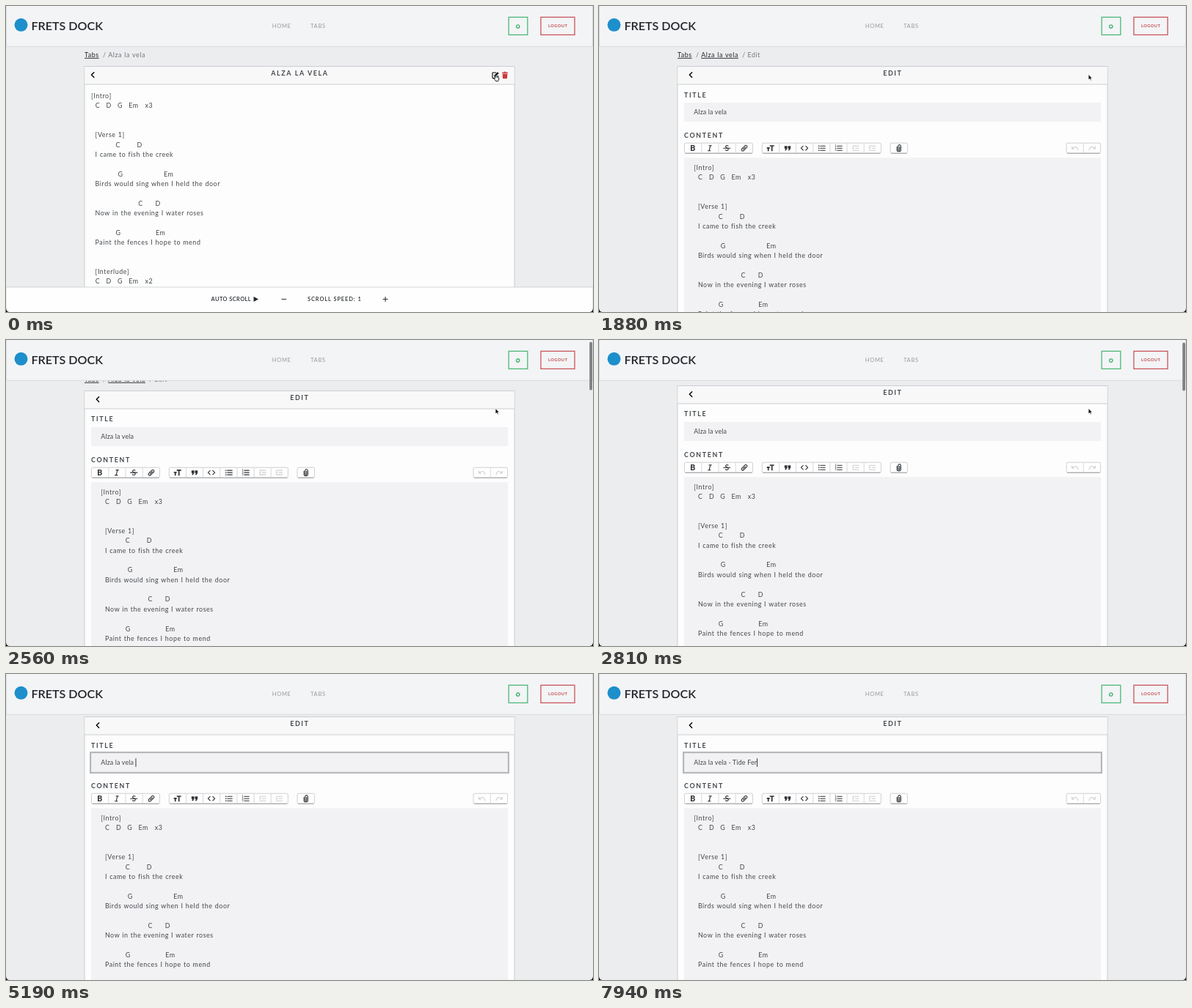
These frames come from a looping animation (800 px wide and 418 px high, 8 s). An HTML page:

```html
<!DOCTYPE html>
<html lang="en">
<head>
<meta charset="utf-8">
<title>Edit a song</title>
<style>
  html, body { margin: 0; width: 100%; height: 100%; overflow: hidden; background: #ecedef; }
  svg { display: block; width: 800px; height: 418px; }
  text { font: 8.89px Lato, "Open Sans", sans-serif; fill: #43474b; white-space: pre; }
  .body { letter-spacing: .57px; word-spacing: .4px; }
  .link { fill: #212529; text-decoration: underline; }
  .mute { fill: #70757a; }
  .cap { font-weight: 700; letter-spacing: 1.65px; }
  .field { letter-spacing: .15px; }
  .brand { font-size: 16.1px; font-weight: 600; fill: #212529; }
  .nav { font-size: 7.5px; letter-spacing: .7px; fill: #96999d; }
  .bar { font-size: 7.4px; font-weight: 600; fill: #24282c; }
  .line { fill: none; stroke: #2c3034; stroke-width: 1.1; stroke-linecap: round; stroke-linejoin: round; }
  .off { stroke: #cdced0; }
</style>
</head>
<body>
<svg id="stage" viewBox="0 0 800 418"></svg>
<script>
const LOOP = 8000, LOAD = 1380, CLICK = 4060, ROW = 13.34;
const SONG = 'Alza la vela', BRAND = 'FRETS DOCK';

// rows of the song: [row, x, text, x, text, ...]
const SHEET = [
  [0, 0, '[Intro]'],
  [1, 5.8, 'C', 20.6, 'D', 36, 'G', 51.2, 'Em', 73.4, 'x3'],
  [4, 5.6, '[Verse 1]'],
  [5, 33.4, 'C', 62.4, 'D'],
  [6, 5.6, 'I came to fish the creek'],
  [8, 36.4, 'G', 99, 'Em'],
  [9, 5.6, 'Birds would sing when I held the door'],
  [11, 64.2, 'C', 87.4, 'D'],
  [12, 5.6, 'Now in the evening I water roses'],
  [14, 33.4, 'G', 88, 'Em'],
  [15, 5.6, 'Paint the fences I hope to mend'],
  [18, 5.6, '[Interlude]'],
  [19, 5.8, 'C', 20.6, 'D', 36, 'G', 51.2, 'Em', 73.4, 'x2']
];

// time of each keystroke
const KEYS = [[5060, ' '], [5500, '-'], [5750, ' '], [6190, 'T'], [6380, 'i'], [6560, 'd'],
  [6750, 'e'], [6940, ' '], [7380, 'F'], [7630, 'e'], [7880, 'r']];
const SCROLL = [[2320, 0], [2380, 6], [2500, 11], [2650, 16], [2810, 20], [3060, 24]];

// y is the middle of the capitals
const text = (x, y, s, cls, size = 8.89, extra = '') =>
  `<text x="${x}" y="${y + size * .36}" class="${cls}" ${extra}>${s}</text>`;
const mid = 'text-anchor="middle"';
const rect = (x, y, w, h, fill, stroke = 'none', extra = '') =>
  `<rect x="${x}" y="${y}" width="${w}" height="${h}" fill="${fill}" stroke="${stroke}" ${extra}/>`;
const path = (d, cls = 'line', extra = '') => `<path d="${d}" class="${cls}" ${extra}/>`;
const at = (x, y, s, id = '') => `<g ${id && `id="${id}"`} transform="translate(${x} ${y})">${s}</g>`;

const card = (title, backX) =>
  rect(107, 82.5, 586, 700, '#fdfdfd', '#cbcdd0') +
  rect(107.5, 83, 585, 23.5, '#f8f8f9') +
  path('M107 107H693', '', 'stroke="#cbcdd0"') +
  text(400.4, 92.2, title, 'cap', 8.89, mid) +
  path(`M${backX + 1.7} 90.7l-3.4 3.4 3.4 3.4`, 'line', 'style="stroke-width:1.4;stroke:#000"');

const sheet = (x, y) => SHEET.map(([row, ...bits]) => {
  let out = '';
  for (let i = 0; i < bits.length; i += 2) out += text(x + bits[i], y + row * ROW, bits[i + 1], 'body');
  return out;
}).join('');

const trash = `<g fill="#cf3a3c">${rect(-4, -4, 8, 1.3, '#cf3a3c')}${rect(-1.5, -4.9, 3, 1.2, '#cf3a3c')}
  <path d="M-3.4-2.2H3.4L2.9 4.7H-2.9Z"/></g>`;
const pencil = path('M.8-3.4H-3.2Q-4-3.4-4-2.6V3.4Q-4 4.2-3.2 4.2H2.6Q3.4 4.2 3.4 3.4V1', 'line', 'style="stroke:#000"') +
  path('M-1.8 2.2L-1.4.2 3-4.2 4.7-2.5.2 1.9Z', '', 'fill="#000"');

const viewPage = () =>
  text(107, 66.7, 'Tabs', 'body link') + text(132, 66.7, '/', 'body mute') + text(139.3, 66.7, SONG, 'body mute') +
  card(SONG.toUpperCase(), 118.2) + at(667, 94.4, pencil) + at(680, 94.6, trash) +
  sheet(116, 122.7) +
  rect(0, 384, 800, 35, '#fefefe', '#d3d5d7') +
  text(279.6, 400.5, 'AUTO SCROLL', 'bar', 7.4, 'letter-spacing=".45"') +
  path('M337.5 397L344 400.5 337.5 404Z', '', 'fill="#24282c"') +
  path('M375.8 400.5H381.6M514 400.5H520M517 397.5V403.5') +
  text(411, 400.5, 'SCROLL SPEED: 1', 'bar', 7.4, 'letter-spacing=".95"');

// toolbar drawings, each around its own centre
const dots = [-3, 0, 3].map(y => rect(-4.6, y - .7, 1.4, 1.4, '#2c3034')).join('');
const digits = [-3, 0, 3].map((y, i) => `<text x="-5" y="${y + 1.2}" style="font-size:3.4px;font-weight:700">${i + 1}</text>`).join('');
const lines = path('M-1.8-3H4.6M-1.8 0H4.6M-1.8 3H4.6');
const indent = d => path(`M-4-3H4.4M0 0H4.4M-4 3H4.4M${d > 0 ? '-4-1.2L-2.6 0-4 1.2' : '-2.6-1.2L-4 0-2.6 1.2'}`, 'line off');
const turn = d => `<g transform="scale(${d} 1)">${path('M-4-2.2V.8H-1M-3.8.6Q-1.6-2.2 1.2-1.6 3.6-.8 4.2 2.4', 'line off')}</g>`;
const quote = [-4.2, .5].map(x => path(`M${x}-3H${x + 3.7}V0L${x + 2.2} 3H${x + .4}L${x + 1.4}.5H${x}Z`, '', 'fill="#2c3034"')).join('');
const glyph = (s, style) => `<text text-anchor="middle" y="3.7" style="font-size:10.5px;fill:#2c3034;${style}">${s}</text>`;
const ICONS = [
  [127.7, glyph('B', 'font-weight:800')],
  [151, path('M-1 -3.5H2.4M-2.4 3.5H1M.8-3.5L-.8 3.5')],
  [174.3, glyph('S', 'font-weight:600') + path('M-4.6 0H4.6')],
  [198, `<g transform="rotate(-45)">${path('M-.4-1.7H-3Q-4.7-1.7-4.7 0T-3 1.7H-.4M.4-1.7H3Q4.7-1.7 4.7 0T3 1.7H.4M-2 0H2')}</g>`],
  [233.7, path('M-1-3.2H5M2-3.2V4M-5-.4H-1M-3-.4V4', 'line', 'style="stroke-width:1.7;stroke-linecap:butt"')],
  [257, quote],
  [280, path('M-1.8-2.8L-4.6 0-1.8 2.8M1.8-2.8L4.6 0 1.8 2.8')],
  [303.6, dots + lines], [326.6, digits + lines],
  [349.6, indent(-1)], [372.2, indent(1)],
  [408.7, path('M-2.6-2V2.2Q-2.6 4.6 0 4.6T2.6 2.2V-2.6Q2.6-4.6.8-4.6T-1-2.6V2Q-1 3 0 3T1 2V-2')],
  [648.6, turn(1)], [672.2, turn(-1)]
];
const group = (x, w, n) => {
  let out = rect(x, 187.2, w, 14, '#fefefe', '#c4c5c7', 'rx="1.6" stroke-width=".8"') +
    path(`M${x + 1} 201.2h${w - 2}`, '', 'stroke="#97999b" stroke-width=".9"');
  for (let i = 1; i < n; i++) out += path(`M${x + w * i / n} 187.5v13.4`, '', 'stroke="#cfd0d2" stroke-width=".8"');
  return out;
};

const editPage = () =>
  text(107, 66.7, 'Tabs', 'body link') + text(132, 66.7, '/', 'body mute') +
  text(139.3, 66.7, SONG, 'body link') + text(195.2, 66.7, '/', 'body mute') + text(202.5, 66.7, 'Edit', 'body mute') +
  card('EDIT', 125) +
  text(116, 121.3, 'TITLE', 'cap') + rect(116, 132, 568, 26, '#f2f2f4') +
  rect(115.1, 131.1, 569.8, 27.8, 'none', '#b6b8bb', 'stroke-width="2.2" id="ring"') +
  text(129.3, 144.9, SONG, 'field', 8.89, 'id="title"') +
  rect(0, 139.2, .9, 11.6, '#222', 'none', 'id="caret"') +
  text(116, 176.5, 'CONTENT', 'cap') +
  group(116.5, 93, 4) + group(222.3, 162, 7) + group(397, 23.4, 1) + group(637, 46.6, 2) +
  ICONS.map(([x, s]) => at(x, 194.2, s)).join('') +
  rect(116, 207.3, 568, 600, '#f2f2f4') + sheet(129.3, 220.6);

let gear = '<circle r="2" fill="none" stroke="#3fb26c" stroke-width="1.1"/>';
for (let a = 0; a < 360; a += 45) gear += rect(-.5, -3.1, 1, 1, '#3fb26c', 'none', `transform="rotate(${a})"`);

const header =
  rect(.5, -1, 799, 56.3, '#f3f4f6', '#d8dadd') +
  '<circle cx="20.5" cy="25.8" r="9" fill="#1d8fcb"/>' +
  text(34.4, 27.2, BRAND, 'brand', 16.1) +
  text(362.8, 27.2, 'HOME', 'nav', 7.5) + text(415, 27.2, 'TABS', 'nav', 7.5) +
  rect(685.1, 15.3, 25.7, 24.1, 'none', '#4db878', 'stroke-width="1.3"') + at(697.7, 28, gear, 'gear') +
  rect(728.9, 15.3, 46.1, 24.1, 'none', '#c9575a', 'stroke-width="1.3"') +
  text(752.1, 27.2, 'LOGOUT', '', 5.6, `${mid} style="font-size:5.6px;font-weight:700;letter-spacing:.5px;fill:#c4484b"`);

const outline = 'stroke="#fff" stroke-width=".8" stroke-linejoin="round"';
const cursors =
  at(0, 0, path('M0 0V7.6L1.8 6 3 8.7 4.3 8.1 3.1 5.5H5.4Z', '', `fill="#000" ${outline}`), 'arrow') +
  at(0, 0, path('M-1.8-3.8Q0-3.8 0-2.8 0-3.8 1.8-3.8M0-2.8V2.8M-1.8 3.8Q0 3.8 0 2.8 0 3.8 1.8 3.8', 'line', 'style="stroke:#000;stroke-width:.9"'), 'beam') +
  at(665.8, 94, path('M.6.6Q1.4-.2 2 .8L2.4 3Q3.4 2.5 3.8 3.3 4.7 2.9 5 3.8 6 3.6 6 4.8L5.6 7.4 5 8.6H1.8L-.6 5.4Q-.8 4.2.8 4.8Z', '', 'fill="#fff" stroke="#000" stroke-width=".9" stroke-linejoin="round"'), 'hand');

const $ = id => document.getElementById(id);
const show = (id, on) => $(id).setAttribute('opacity', +on);
const move = (id, x, y, more = '') => $(id).setAttribute('transform', `translate(${x} ${y}) ${more}`);
const clamp = v => Math.min(1, Math.max(0, v));
const ramp = (t, a, b) => clamp((t - a) / (b - a));

$('stage').innerHTML =
  rect(0, 0, 800, 418, '#ecedef') +
  `<g id="view">${viewPage()}</g><g id="edit">${editPage()}</g>` + header +
  rect(795.2, 1, 3.8, 66, '#7f8183', 'none', 'rx="1.9" id="thumb"') + cursors +
  path('M0 413Q.4 418 5 418H0ZM800 413Q799.6 418 795 418H800Z', '', 'fill="#0b0b0b"');

function track(keys, t) {
  let v = keys[0][1];
  for (let i = 1; i < keys.length; i++) v += (keys[i][1] - keys[i - 1][1]) * ramp(t, keys[i - 1][0], keys[i][0]);
  return v;
}

function draw(t) {
  const editing = t >= LOAD;
  show('view', !editing);
  show('edit', editing);

  const y = track(SCROLL, t);
  move('edit', 0, -y);
  $('thumb').setAttribute('y', 1 + y * .12);
  show('thumb', t >= 2340 ? 1 - ramp(t, 3560, 3800) : 0);

  const typed = KEYS.filter(k => k[0] <= t);
  const last = typed.length ? typed[typed.length - 1][0] : CLICK;
  $('title').textContent = SONG + typed.map(k => k[1]).join('');
  $('caret').setAttribute('x', 129.3 + $('title').getComputedTextLength());
  show('caret', t >= CLICK && (t - last) % 1000 < 500);
  show('ring', ramp(t, 4140, 4300));

  const p = ramp(t, 3220, 3920), e = p * p * (3 - 2 * p);
  const x = 667 - 289.6 * e, cy = 93.4 + 30 * e;
  const inField = cy > 108;
  show('hand', !editing);
  show('arrow', editing && !inField);
  show('beam', inField && t < KEYS[0][0]);
  move('arrow', x, cy);
  move('beam', x, cy);

  // the spinner stalls while the next page loads
  const spin = editing ? t - LOAD : Math.min(t, 1000);
  move('gear', 697.7, 28, `rotate(${spin * .18})`);
}

function tick(now) {
  draw(now % LOOP);
  requestAnimationFrame(tick);
}
draw(0);
requestAnimationFrame(tick);
</script>
</body>
</html>
```
